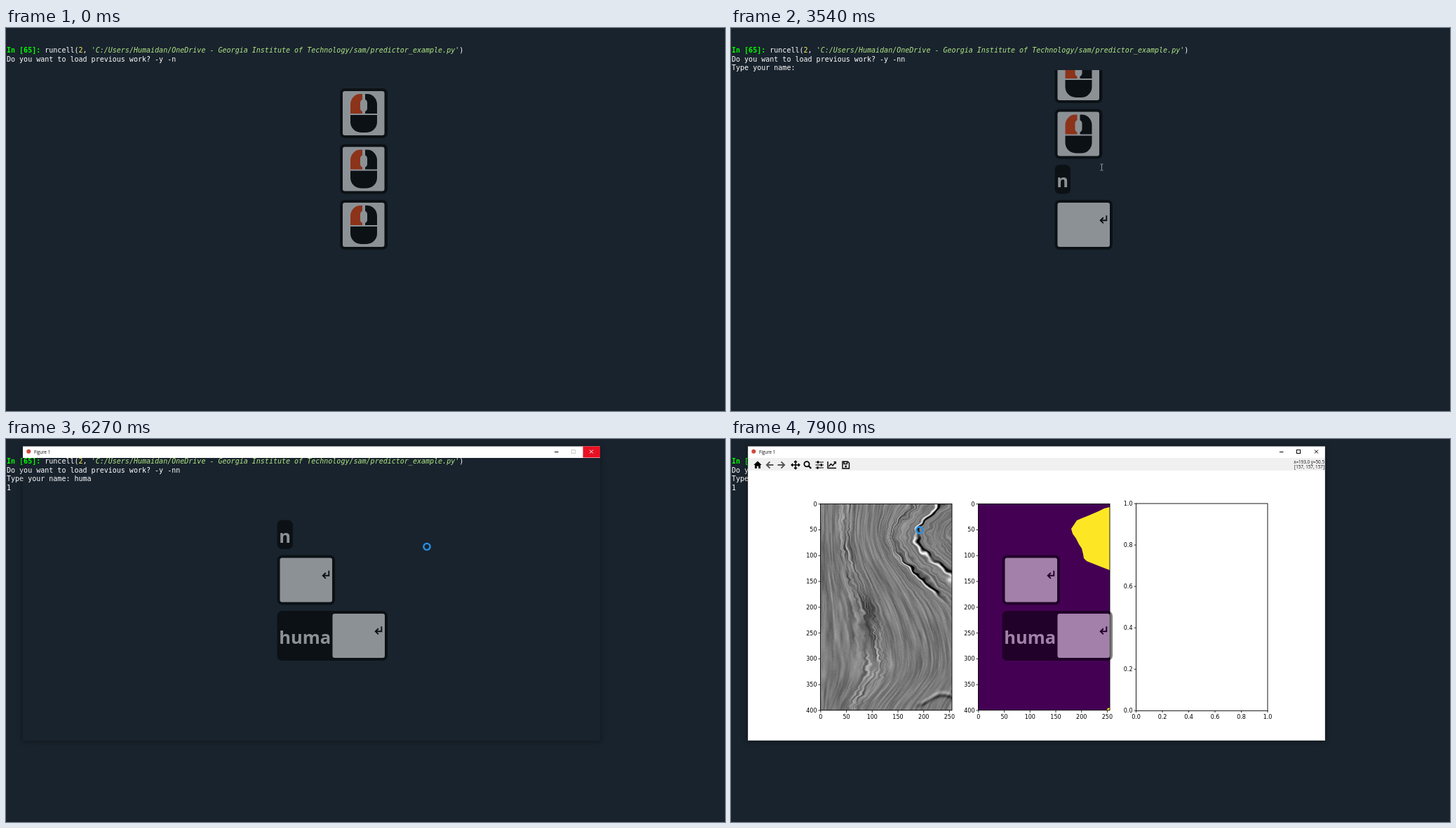
Animation, 1025 px wide and 546 px high, one loop 8000 ms. Source, as an HTML page with a canvas:

```html
<!DOCTYPE html>
<html lang="en">
<head>
<meta charset="utf-8">
<title>Console and figure</title>
<style>
  html, body { margin: 0; width: 100%; height: 100%; overflow: hidden; background: #19232d; }
  svg, canvas, #shadow { position: absolute; left: 0; top: 0; }
  #shadow { left: 24px; top: 10px; width: 823px; height: 420px; box-shadow: 0 1px 8px rgba(0,0,0,.4); }
  #seismic { left: 128px; top: 93px; }
  text { white-space: pre; }
  .mono { font: 10.03px "DejaVu Sans Mono", monospace; fill: #fff; }
  .prompt { fill: #0f0; font-weight: bold; }
  .ui { font: 6.3px "Open Sans", sans-serif; fill: #111; }
  .tick { font: 8px "DejaVu Sans", sans-serif; fill: #000; }
  .key { font: bold 25.5px "Noto Sans", sans-serif; fill: #fff; }
  .line { fill: none; stroke: #000; }
</style>
</head>
<body>
<svg width="1025" height="546">
  <text class="mono" x="1" y="35"><tspan class="prompt">In [65]: </tspan>runcell(<tspan fill="#faed5c">2</tspan>, <tspan fill="#b0e686" font-style="italic">'C:/Users/Humaidan/OneDrive - Georgia Institute of Technology/sam/predictor_example.py'</tspan>)</text>
  <text class="mono" x="1" y="47.7" id="ask"></text>
  <text class="mono" x="1" y="60.4" id="name"></text>
  <text class="mono" x="1" y="73.1" id="out"></text>
  <rect id="caret" width="1" height="12.5" fill="#fff"/>
</svg>
<div id="shadow"></div>
<svg width="1025" height="546">
  <g id="title">
    <rect x="24" y="10.5" width="823" height="16.5" fill="#fff"/>
    <circle cx="32.3" cy="17.8" r="3" fill="#cf4a3c"/>
    <text class="ui" x="40" y="20.6">Figure 1</text>
    <rect id="closeBg" x="822.5" y="10.5" width="24.5" height="16" fill="#e81123"/>
    <path class="line" d="M782 18.5h5.5"/>
    <rect id="max" class="line" x="806.5" y="15.5" width="5" height="5"/>
    <path id="cross" class="line" d="M832 15.5l5 5m0-5l-5 5"/>
  </g>
  <g id="body">
    <rect x="24" y="27" width="823" height="403" fill="#fff"/>
    <rect x="24" y="27" width="823" height="18" fill="#f0f0f0"/>
    <path class="line" style="stroke:#555" stroke-opacity=".5" stroke-width=".6" d="M24.2 10.5V429.7H846.8V10.5"/>
    <path d="M38 31.5l5.7 5.5H42v5h-2.8v-3.2h-2.4V42H34v-5h-1.7z"/>
    <path class="line" style="stroke:#555" stroke-width="1.9" d="M60.5 37H51M55.5 32.3L50.8 37l4.7 4.7M66.5 37H76M71.5 32.3L76.2 37l-4.7 4.7"/>
    <path class="line" stroke-width="1.5" d="M92 31.5v11M86.5 37h11M90 33.2l2-2 2 2M90 40.8l2 2 2-2M88.2 35l-2 2 2 2M95.8 35l2 2-2 2"/>
    <circle class="line" cx="108" cy="35.7" r="3.6" stroke-width="1.8"/>
    <path class="line" stroke-width="2.2" d="M110.8 38.5l3.4 3.6"/>
    <path class="line" stroke-width="1.2" d="M120.5 33H132M120.5 37H132M120.5 41H132"/>
    <path class="line" stroke-width="2.2" d="M124 31.3v3.4M128.8 35.3v3.4M123.5 39.3v3.4"/>
    <path class="line" stroke-width="1.4" d="M138 32v9.5h12M139.5 39l3-3.5 2.5 2.5 4-5M146.5 32.6h2.8v2.8"/>
    <path class="line" stroke-width="1.4" d="M159 32.2h7.5l2 2V42H159zM161 32.5v3h4.5v-3"/>
    <circle cx="163.6" cy="39" r="1.5"/>
  </g>
</svg>
<canvas id="seismic" width="187" height="294"></canvas>
<svg width="1025" height="546">
  <defs><clipPath id="clip"><rect y="60" width="1025" height="486"/></clipPath></defs>
  <g id="plots">
    <rect x="352.5" y="92.5" width="187.5" height="294" fill="#440154"/>
    <path fill="#fde725" d="M540 97l-8 2-8 4-14 6-10 4-7 3-4 6-4 6 2 7 5 7 4 8 4 6 2 8 1 6 4 4 10 4 10 4 13 5zM540 383l-3 1-2 3h5z"/>
  </g>
  <g clip-path="url(#clip)"><g id="keys" opacity=".5"></g></g>
  <g class="ui" id="readout" text-anchor="end"><text x="846" id="coords"></text><text x="846" y="42.3" id="value"></text></g>
  <g id="cursor">
    <path id="beam" class="line" style="stroke:#959a9f" d="M-2-4.5h1.500l.5.5.5-.5H2M0-4V4M-2 4.5h1.500l.5-.5.5.5H2"/>
    <circle id="ring" r="4.600" fill="none" stroke="#2492e8" stroke-width="2.4"/>
    <path id="arrow" fill="#fff" stroke="#222" stroke-width=".8" d="M0 0v9.500l2.200-2 1.500 3.500 1.500-.7-1.500-3.300h3z"/>
  </g>
</svg>
<script>
const LOOP = 8000, WORD = 'huma';
const $ = id => document.getElementById(id);
const show = (id, on) => $(id).style.display = on ? '' : 'none';
const clamp = (v, a = 0, b = 1) => Math.min(b, Math.max(a, v));
const mix = (a, b, p) => a + (b - a) * p;
const span = (n, f) => Array.from({ length: n }, (_, i) => f(i));

// ---- plot axes
function axes(left, top, bottom, xs, ys) {
  let s = `<rect class="line" stroke-width=".9" x="${left}" y="${top}" width="187.5" height="${bottom - top}"/>`;
  for (const [x, label] of xs)
    s += `<path class="line" stroke-width=".8" d="M${x} 387v3"/><text class="tick" text-anchor="middle" x="${x}" y="398.8">${label}</text>`;
  for (const [y, label] of ys)
    s += `<path class="line" stroke-width=".8" d="M${left} ${y}h-3"/><text class="tick" text-anchor="end" x="${left - 5}" y="${y + 2.9}">${label}</text>`;
  $('plots').insertAdjacentHTML('beforeend', s);
}
const fifths = i => (i / 5).toFixed(1);
for (const left of [127.5, 352.5])
  axes(left, 92.5, 386.7, span(6, i => [left + .4 + i * 36.7, i * 50]), span(9, i => [92.7 + i * 36.78, i * 50]));
axes(577.5, 92, 387.4, span(6, i => [577.5 + i * 37.5, fifths(i)]), span(6, i => [387.3 - i * 59.05, fifths(i)]));

// ---- layered grey section
function hash(i, j) {
  let h = Math.imul(i, 374761393) + Math.imul(j, 668265263);
  h = Math.imul(h ^ h >>> 13, 1274126177);
  return ((h ^ h >>> 16) >>> 0) / 2 ** 32;
}
function noise(x, y) {
  const i = Math.floor(x), j = Math.floor(y), s = p => p * p * (3 - 2 * p);
  const u = s(x - i), v = s(y - j);
  return mix(mix(hash(i, j), hash(i + 1, j), u), mix(hash(i, j + 1), hash(i + 1, j + 1), u), v);
}
const levels = [92, 130, 165, 200, 240, 290, 330, 355, 387];
const horizons = [
  [127, 127, 127, 127, 127, 127, 127, 127, 127],
  [160, 158, 161, 170, 188, 199, 204, 188, 163],
  [215, 206, 215, 240, 264, 282, 285, 268, 238],
  [262, 226, 238, 272, 318, 330, 335, 320, 300],
  [305, 260, 278, 325, 370, 380, 385, 370, 350]
];
const depth = [0, 33, 86, 122, 155];
function at(curve, y) {
  y = clamp(y, 92, 387);
  let k = 0;
  while (k < levels.length - 2 && y > levels[k + 1]) k++;
  return mix(curve[k], curve[k + 1], (y - levels[k]) / (levels[k + 1] - levels[k]));
}
const smoothAt = (curve, y) => [-14, -7, 0, 7, 14].reduce((s, d) => s + at(curve, y + d) / 5, 0);
const bump = (d, w) => Math.exp(-d * d / w);

function paintSection() {
  const ctx = $('seismic').getContext('2d'), img = ctx.createImageData(187, 294);
  for (let r = 0; r < 294; r++) {
    const y = r + 93, cs = horizons.map(c => smoothAt(c, y)), fold = clamp((235 - y) / 25);
    for (let c = 0; c < 187; c++) {
      const x = c + 128;
      let k = 0;
      while (k < 3 && x > cs[k + 1]) k++;
      let u = mix(depth[k], depth[k + 1], (x - cs[k]) / (cs[k + 1] - cs[k]));
      u += 7 * (noise(x / 9, y / 7) - .5) * clamp((u - 85) / 20) * fold;
      u += 4 * (noise(x / 12, y / 4) - .5) * bump(u - 37, 130);
      const grain = noise(u / 2, y / 40) + .6 * noise(u / 1.1 + 90, y / 14) - .8;
      const amp = 46 + 85 * bump(u - 37, 70) + 50 * bump(u - 118, 200) * fold;
      let v = 122 + amp * grain + 10 * (hash(x, y) - .5);
      // two bold reflectors, the outer one broken up
      for (const m of [122, 155]) {
        const power = fold * (m > 150 ? 1 : .2 + .8 * clamp((y - 160) / 25)) * (.4 + noise(m, y / 9));
        v += power * (95 * bump(u - m + 4, 4) - 115 * bump(u - m, 4));
      }
      v += 100 * bump(Math.hypot(x - 312, y - 200), 16);
      const low = y - 371 + (x - 292) * .2 + 4 * Math.sin(x / 9);
      v += clamp((x - 262) / 15) * (40 * bump(low + 5, 6) - 60 * bump(low, 6));
      const p = 4 * (r * 187 + c);
      img.data[p] = img.data[p + 1] = img.data[p + 2] = v;
      img.data[p + 3] = 255;
    }
  }
  ctx.putImageData(img, 0, 0);
}
paintSection();

// ---- key display: each block has width, height and markup
const box = (w, h, inner) => ({ w, h, svg: `<rect width="${w}" height="${h}" rx="7"/>${inner}` });
const enter = x => `<g transform="translate(${x})"><rect x="4" y="4" width="74.5" height="63" rx="3" fill="#fff"/>
  <path class="line" stroke-width="1.9" d="M73.8 22.3v7H66M69.4 25.2l-4.200 4.100 4.200 4.100"/></g>`;
const label = (s, y) => `<text class="key" x="2.8" y="${y}">${s}</text>`;
const mouse = box(68, 71, `<rect x="4" y="4" width="59.5" height="63" rx="3" fill="#fff"/>
  <path fill="#ff4408" d="M32 8H29A14 15 0 0 0 15 23v13h17z"/><path d="M36 8h3a14 15 0 0 1 14 15v13H36z"/>
  <path d="M15 38h38v10a15 15 0 0 1-15 15h-8a15 15 0 0 1-15-15z"/>
  <rect x="29" y="15.5" width="10" height="18" rx="5" fill="#fff"/>`);
const typedWidth = [0, 23, 39, 64, 80];
const typeTimes = [4010, 4150, 4290, 4360];

function blocks(t, typed) {
  const fade = start => 1 - clamp((Math.floor((t - start) / 67) + 1) / 3);
  const list = span(3, () => ({ ...mouse, a: fade(5870) }));
  if (t >= 1690) list.push({ ...box(22.5, 41.5, label('n', 32)), a: fade(6890) });
  if (t >= 2950) list.push(box(82.5, 71, enter(0)));
  if (t >= 4690) list.push(box(157.5, 71, label(WORD, 47) + enter(75)));
  else if (typed) list.push(box(typedWidth[typed], 41.5, label(WORD.slice(0, typed), 32)));
  return list;
}
let lastKeys = '';
function drawKeys(t, typed) {
  const list = blocks(t, typed), left = 544 - Math.max(...list.map(b => b.w));
  let y = 324.5, s = '';
  for (const b of list.reverse()) {
    y -= b.h + 8.5;
    s += `<g transform="translate(${left} ${y})" opacity="${b.a ?? 1}">${b.svg}</g>`;
  }
  if (s !== lastKeys) $('keys').innerHTML = lastKeys = s;
}

// ---- pointer: time, x, y
const path = [
  [50, 985, 535], [870, 505, 185], [1070, 505, 185], [1400, 528.5, 198.5], [5060, 528.5, 198.5],
  [5400, 574, 131], [5730, 600, 153.5], [6550, 600, 153.5], [6580, 601, 153.5], [6750, 601, 153.5],
  [7100, 450, 163], [7500, 298, 132], [7640, 268.7, 129.9], [LOOP, 268.7, 129.9]
];
function pointer(t) {
  t = clamp((Math.floor(t / 70) + 1) * 70, 50, LOOP);
  let k = 0;
  while (t > path[k + 1][0]) k++;
  const [a, b] = [path[k], path[k + 1]], p = (t - a[0]) / (b[0] - a[0]), e = p * (2 - p);
  return [mix(a[1], b[1], e), mix(a[2], b[2], e)];
}
function drawReadout(t, x, y) {
  let line = '', value = '';
  const inside = left => x > left && x < left + 187.5 && y > 92 && y < 387;
  const put = (px, py, digits) => line = `x=${px.toFixed(digits)} y=${py.toFixed(digits)}`;
  if (t >= 6750) {
    if (inside(577.5)) put((x - 577.5) / 187.5, (387.3 - y) / 295, 2);
    for (const left of [127.5, 352.5]) if (inside(left)) {
      put((x - left) / .7333 + .45, (y - 92.5) / .7363 - .3, 1);
      const grey = Math.round(157 - 60 * Math.sin((x - 268.7) / 6));
      value = left > 300 ? '[0]' : `[${grey}, ${grey}, ${grey}]`;
    }
  }
  $('coords').textContent = line;
  $('coords').setAttribute('y', value ? 35.3 : 38.5);
  $('value').textContent = value;
}
function drawPointer(t) {
  const [x, y] = pointer(t), busy = t >= 5730 && t < 6550 || t >= 7830;
  $('cursor').setAttribute('transform', `translate(${x} ${y})`);
  show('beam', t >= 120 && t < 5730);
  show('ring', busy);
  show('arrow', t >= 6550 && !busy);
  drawReadout(t, x, y);
}

// ---- console and window; caret spans: on, off, x, y
function drawConsole(t, typed) {
  $('ask').textContent = 'Do you want to load previous work? -y -n' + (t >= 1690 ? 'n' : '');
  $('name').textContent = t >= 3020 ? 'Type your name: ' + WORD.slice(0, typed) : '';
  $('out').textContent = t >= 4690 ? '1' : '';
  const spans = [[870, 1400, 242, 38], [1690, 2350, 248, 38], [2880, 2950, 248, 38],
    [3020, 3540, 97, 50.5], [4010, 4550, 97 + Math.round(typed * 6.25), 50.5]];
  const on = spans.find(s => t >= s[0] && t < s[1]);
  show('caret', on);
  if (on) { $('caret').setAttribute('x', on[2]); $('caret').setAttribute('y', on[3]); }
}
function drawWindow(t) {
  const open = t >= 6270, filled = t >= 6340, plotted = t >= 6480;
  show('shadow', open);
  show('title', open);
  show('body', filled);
  show('closeBg', !filled);
  $('cross').style.stroke = filled ? '#000' : '#fff';
  $('max').style.stroke = filled ? '#000' : '#ccc';
  show('plots', plotted);
  show('seismic', plotted);
}
function frame() {
  const t = performance.now() % LOOP, typed = typeTimes.filter(s => t >= s).length;
  drawConsole(t, typed);
  drawWindow(t);
  drawKeys(t, typed);
  drawPointer(t);
  requestAnimationFrame(frame);
}
frame();
</script>
</body>
</html>
```
